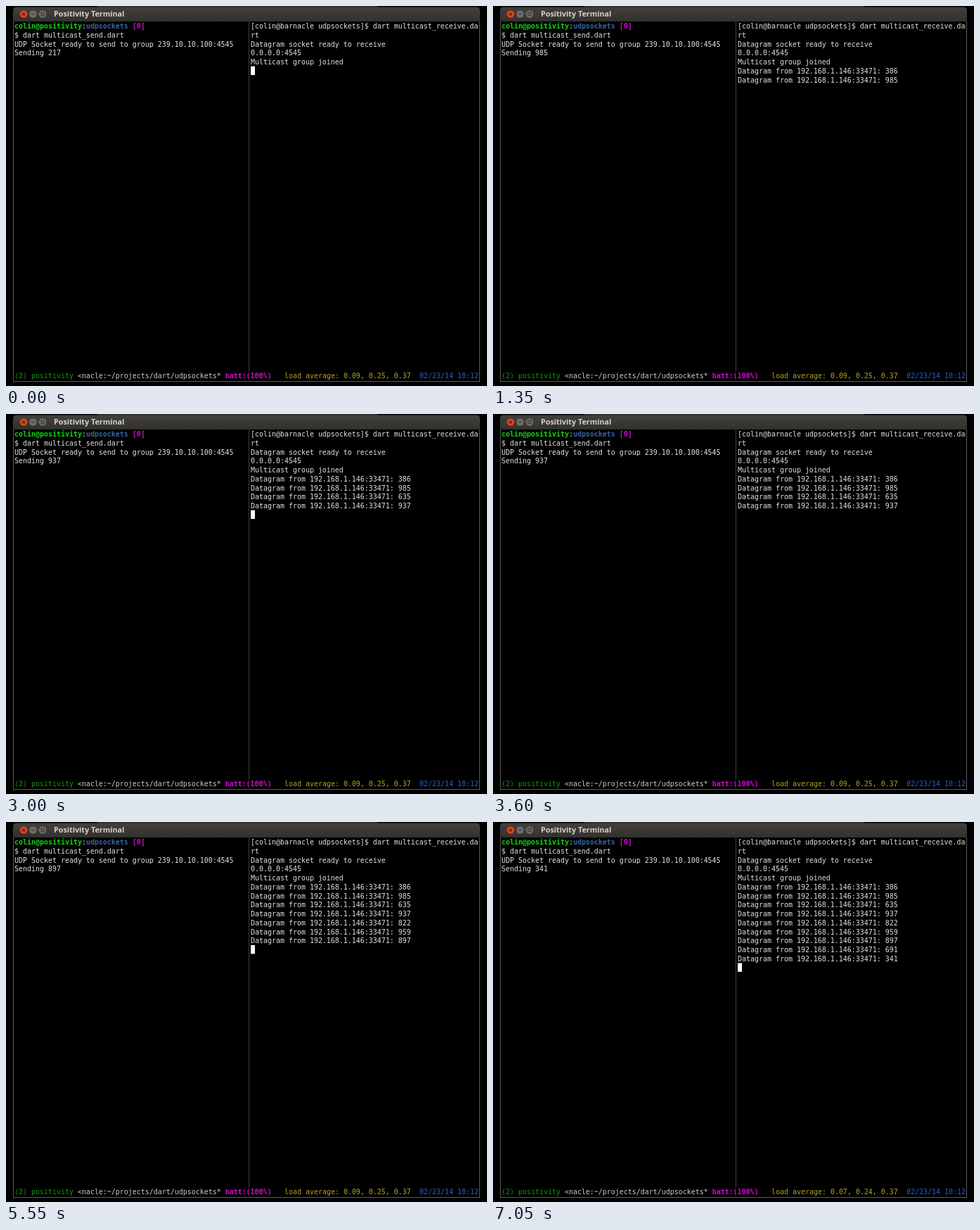
Write an HTML page with a canvas that moves like this. It is 684 px wide and 540 px high and loops after 7200 ms.

```html
<!DOCTYPE html>
<html lang="en">
<head>
<meta charset="utf-8">
<title>Terminal</title>
<style>
  html, body { margin: 0; width: 100%; height: 100%; overflow: hidden; background: #000; }
  #stage { position: relative; width: 684px; height: 540px; overflow: hidden; background: #000; }
  canvas { position: absolute; left: 0; top: 0; }
  .row {
    position: absolute; white-space: pre; color: #e2e4de;
    font: 9.967px/12.74px "DejaVu Sans Mono", monospace;
  }
  #title {
    position: absolute; left: 68px; top: 3px; white-space: pre; color: #d6d2c6;
    font: bold 10.75px/16px "Open Sans", sans-serif;
  }
  b.user { color: #10d810; }
  b.dir { color: #3465a4; }
  b.mark { color: #d408d4; }
  .host { color: #149414; }
  .path { color: #cccec8; }
  .load { color: #b4a420; }
  .date { color: #2a5cd4; }
</style>
</head>
<body>
<div id="stage">
  <canvas id="view" width="684" height="540"></canvas>
  <div id="title">Positivity Terminal</div>
</div>
<script>
const LOOP = 7200, TOP = 23.05, LINE = 12.75, CHAR = 6;
const stage = document.getElementById('stage');
const g = document.getElementById('view').getContext('2d');

// Arrival time and value of each datagram
const packets = [
  [600, 386], [1350, 985], [2100, 635], [3000, 937], [4050, 822],
  [4800, 959], [5550, 897], [6450, 691], [7050, 341]
];
// The cursor starts visible and flips at each of these times
const flips = [300, 1050, 1350, 1800, 2100, 2550, 3300, 4050, 4350,
  4800, 5100, 5550, 6000, 6450, 6600, 7050];

function addRow(col, row, html) {
  const el = document.createElement('div');
  el.className = 'row';
  el.style.left = 12 + col * CHAR + 'px';
  el.style.top = Math.round(TOP + row * LINE) + 'px';
  el.innerHTML = html;
  stage.appendChild(el);
  return el;
}

function rect(color, x, y, w, h) {
  g.fillStyle = color;
  g.fillRect(x, y, w, h);
}

function button(x, color, edge) {
  g.beginPath();
  g.arc(x, 11.5, 5.5, 0, Math.PI * 2);
  g.fillStyle = color;
  g.fill();
  g.strokeStyle = edge;
  g.lineWidth = 0.8;
  g.stroke();
}

function drawWindow() {
  rect('#34362c', 130, 0, 398, 1.5);

  const bar = g.createLinearGradient(0, 1, 0, 22);
  bar.addColorStop(0, '#42413d');
  bar.addColorStop(1, '#32312d');
  g.fillStyle = bar;
  g.beginPath();
  g.roundRect(10, 1.5, 664, 20.5, [5, 5, 0, 0]);
  g.fill();

  rect('#5c5b57', 10, 22, 1, 512);
  rect('#5c5b57', 673, 22, 1, 512);
  rect('#5c5b57', 10, 533, 664, 1);
  rect('#344a34', 345, 22, 1, 497);

  button(25, '#d64a26', '#7a2814');
  button(38.5, '#6e6c66', '#474641');
  button(52, '#6e6c66', '#474641');

  g.lineWidth = 1.1;
  g.strokeStyle = '#5c1c0c';
  g.beginPath();
  g.moveTo(23, 9.5); g.lineTo(27, 13.5);
  g.moveTo(27, 9.5); g.lineTo(23, 13.5);
  g.stroke();
  g.strokeStyle = '#3a3935';
  g.beginPath();
  g.moveTo(36, 11.5); g.lineTo(41, 11.5);
  g.stroke();
  g.strokeRect(50, 9.5, 4, 4);
}

addRow(0, 0, '<b class="user">colin@positivity</b>:<b class="dir">udpsockets</b> <b class="mark">[0]</b>');
addRow(0, 1, '$ dart multicast_send.dart');
addRow(0, 2, 'UDP Socket ready to send to group 239.10.10.100:4545');
const sending = addRow(0, 3, '');
[
  '[colin@barnacle udpsockets]$ dart multicast_receive.da',
  'rt',
  'Datagram socket ready to receive',
  '0.0.0.0:4545',
  'Multicast group joined'
].forEach((text, i) => addRow(56, i, text));
const received = packets.map(([, n], i) =>
  addRow(56, 5 + i, 'Datagram from 192.168.1.146:33471: ' + n));

addRow(0, 39, '<span class="host">(2) positivity</span> ' +
  '<span class="path">&lt;nacle:~/projects/dart/udpsockets*</span> ' +
  '<b class="mark">batt:(100%)</b>');
const load = addRow(64, 39, '');
load.classList.add('load');
addRow(96, 39, '<span class="date">02/23/14 10:12</span>');

const setText = (el, text) => {
  if (el.textContent !== text) el.textContent = text;
};

function render(t) {
  const count = packets.filter(p => p[0] <= t).length;
  const lit = flips.filter(f => f <= t).length % 2 === 0;
  g.clearRect(0, 0, 684, 540);
  drawWindow();
  if (lit) rect('#fff', 348, TOP - 1.1 + (5 + count) * LINE, 6, 12.4);
  setText(sending, 'Sending ' + (count ? packets[count - 1][1] : 217));
  received.forEach((el, i) => {
    el.style.visibility = i < count ? 'visible' : 'hidden';
  });
  setText(load, 'load average: ' + (t < 6000 ? '0.09, 0.25' : '0.07, 0.24') + ', 0.37');
}

const start = performance.now();
function tick() {
  render((performance.now() - start) % LOOP);
  requestAnimationFrame(tick);
}
tick();
</script>
</body>
</html>
```
